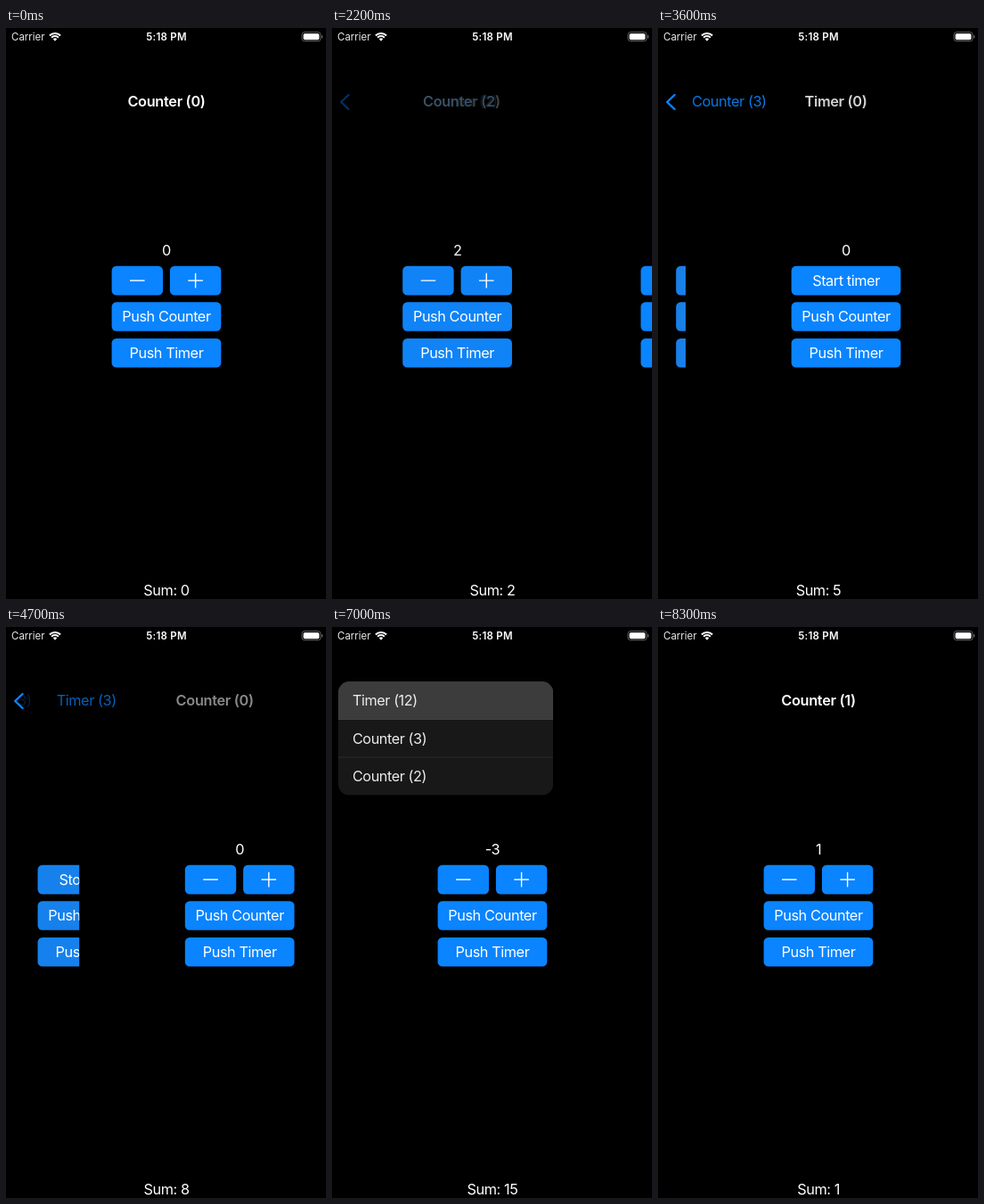
Animation, 359 px wide and 640 px high, one loop 8400 ms. Source, as an HTML page with a canvas:

```html
<!DOCTYPE html>
<html lang="en">
<head>
<meta charset="utf-8">
<title>Counter</title>
<style>
  html, body { margin: 0; width: 100%; height: 100%; overflow: hidden; background: #000; }
  canvas { display: block; width: 359px; height: 640px; }
</style>
</head>
<body>
<canvas id="stage"></canvas>
<script>
const W = 359, H = 640, MID = 180, LOOP = 8400, STEP = 100;
const BLUE = '#0a84ff', PRESSED = '#409cff';
const canvas = document.getElementById('stage');
const ratio = window.devicePixelRatio || 1;
canvas.width = W * ratio;
canvas.height = H * ratio;
const ctx = canvas.getContext('2d');

// Button presses: start, end, page, button
const presses = [
  [1600, 1700, 0, 'plus'], [1800, 1900, 0, 'plus'], [2000, 2100, 0, 'counter'],
  [2700, 2800, 1, 'plus'], [2900, 3000, 1, 'plus'], [3100, 3200, 1, 'plus'],
  [3300, 3400, 1, 'timer'], [3700, 3750, 2, 'toggle'], [4400, 4500, 2, 'counter'],
  [5200, 5300, 3, 'minus'], [5500, 5600, 3, 'minus'], [5800, 5900, 3, 'minus'],
  [8000, 8100, 0, 'minus']
];
const pushes = [2130, 3377, 4546];
const POP = 7500, TIMER_START = 3750, TICK = 250;
const MENU_OPEN = 6600, MENU_CLOSE = 7250;

const clamp = v => Math.max(0, Math.min(1, v));

// Critically damped spring, from 1 down to 0
function spring(ms) {
  const k = 18.26 * Math.max(0, ms) / 1000;
  return (1 + k) * Math.exp(-k);
}

function count(page, t) {
  if (page === 2) return Math.max(0, Math.floor((Math.min(t, POP) - TIMER_START) / TICK));
  let n = 0;
  for (const [, end, p, name] of presses) {
    if (p === page && t >= end) n += name === 'plus' ? 1 : name === 'minus' ? -1 : 0;
  }
  return n;
}

const title = (page, t) => `${page === 2 ? 'Timer' : 'Counter'} (${count(page, t)})`;

function isPressed(page, name, t) {
  return presses.some(([a, b, p, n]) => p === page && n === name && t >= a && t < b);
}

function font(size, weight, spacing) {
  ctx.font = `${weight} ${size}px Inter, Roboto, sans-serif`;
  ctx.letterSpacing = spacing + 'px';
}

function text(str, x, y, { align = 'left', size = 16.3, weight = 400, gap = -0.43, color = '#fff', alpha = 1 } = {}) {
  if (alpha <= 0) return;
  ctx.save();
  font(size, weight, gap);
  ctx.textAlign = align;
  ctx.fillStyle = color;
  ctx.globalAlpha *= alpha;
  ctx.fillText(str, x, y);
  ctx.restore();
}

function box(x, y, w, h, r, color) {
  ctx.fillStyle = color;
  ctx.beginPath();
  ctx.roundRect(x, y, w, h, r);
  ctx.fill();
}

function stroke(points, color, width) {
  ctx.strokeStyle = color;
  ctx.lineWidth = width;
  ctx.beginPath();
  points.forEach(([x, y]) => ctx.lineTo(x, y));
  ctx.stroke();
}

function statusBar() {
  text('Carrier', 6, 14, { size: 11.5, gap: 0, color: '#e8e8e8' });
  text('5:18 PM', MID, 14, { size: 11.5, weight: 600, gap: 0.25, align: 'center' });
  ctx.save();
  ctx.strokeStyle = ctx.fillStyle = '#fff';
  ctx.lineWidth = 2;
  const a = -Math.PI * 0.75, b = -Math.PI * 0.25;
  for (const r of [8.6, 5.5]) {
    ctx.beginPath();
    ctx.arc(55, 14.6, r, a, b);
    ctx.stroke();
  }
  ctx.beginPath();
  ctx.moveTo(55, 14.8);
  ctx.arc(55, 14.6, 3.2, a, b);
  ctx.fill();
  ctx.strokeStyle = '#606060';
  ctx.lineWidth = 1;
  ctx.beginPath();
  ctx.roundRect(332, 4.7, 21, 10, 2.8);
  ctx.stroke();
  box(333.6, 6.2, 17.8, 7, 1.6, '#fff');
  box(354, 8, 1.3, 3.6, 0.7, '#606060');
  ctx.restore();
}

function button(page, name, x, y, w, label, t, dim) {
  const down = isPressed(page, name, t);
  const base = `rgb(${10 + 16 * dim}, ${132 - 4 * dim}, ${255 - 25 * dim})`;
  box(x, y, w, 32.6, 5.2, down ? PRESSED : base);
  const ink = down ? '#d9ebff' : '#fff', mx = x + w / 2, my = y + 16.3;
  if (label) {
    text(label, mx, my + 5.7, { align: 'center', color: ink });
  } else {
    stroke([[mx - 8.3, my], [mx + 8.3, my]], ink, 1.4);
    if (name === 'plus') stroke([[mx, my - 8.3], [mx, my + 8.3]], ink, 1.4);
  }
}

function drawPage(page, dx, t, dim = 0) {
  ctx.save();
  ctx.translate(dx, 0);
  ctx.globalAlpha = 1 - 0.1 * dim;
  text(String(count(page, t)), MID, 255, { align: 'center' });
  ctx.globalAlpha = 1;
  const x = 118.6, w = 122.7;
  if (page === 2) {
    button(page, 'toggle', x, 266.8, w, t < TIMER_START ? 'Start timer' : 'Stop timer', t, dim);
  } else {
    button(page, 'minus', x, 266.8, 57.4, '', t, dim);
    button(page, 'plus', 183.9, 266.8, 57.4, '', t, dim);
  }
  button(page, 'counter', x, 307.2, w, 'Push Counter', t, dim);
  button(page, 'timer', x, 348, w, 'Push Timer', t, dim);
  ctx.restore();
}

function chevron(alpha) {
  ctx.save();
  ctx.globalAlpha = alpha;
  ctx.lineCap = ctx.lineJoin = 'round';
  stroke([[18.6, 75], [10.2, 83], [18.6, 91]], BLUE, 2.4);
  ctx.restore();
}

function titleWidth(str) {
  font(16.3, 600, -0.3);
  return ctx.measureText(str).width;
}

function heading(str, x, alpha) {
  text(str, x, 88.4, { align: 'center', weight: 600, gap: -0.3, alpha });
}

function backLabel(str, x, alpha) {
  ctx.save();
  ctx.beginPath();
  ctx.rect(14, 60, W, 50);
  ctx.clip();
  text(str, x, 88.4, { color: BLUE, alpha });
  ctx.restore();
}

// p: share of the way the upper page still is off to the right
function navBar(under, over, p, t, held) {
  if (over === 0) {
    heading(title(0, t), MID, 1);
    return;
  }
  const from = title(under, t), to = title(over, t);
  const fw = titleWidth(from), tw = titleWidth(to);
  const shift = (MID - fw / 2 - 20) * p;
  const press = held ? 0.35 : 1;
  if (p > 0.001) {
    const old = over === 3 && t >= POP ? title(2, t) : under > 0 ? title(under - 1, t) : '';
    if (under > 0) backLabel(old, 28 - 0.3 * W * (1 - p), p);
    heading(from, 28 + fw / 2 + shift, clamp(2 * p - 1));
  }
  chevron((under > 0 ? 1 : 1 - p) * press);
  backLabel(from, 28 + shift, clamp(1 - 1.2 * p) * press);
  heading(to, MID + (MID + tw * 0.65) * p, clamp(1 - 2 * p));
}

function menu(t) {
  if (t < MENU_OPEN || t >= MENU_CLOSE + 250) return;
  const closing = t >= MENU_CLOSE;
  const p = closing ? 1 - spring(t - MENU_CLOSE) : spring(t - MENU_OPEN);
  const x = 7, y = 61, w = 242, h = 128, row = h / 3;
  const hot = t < 7000 || closing ? -1 : t < 7100 ? 0 : t < 7200 ? 1 : 2;
  ctx.save();
  ctx.translate(x, y);
  ctx.scale(1 - 0.6 * p, 1 - 0.6 * p);
  ctx.globalAlpha = clamp(1 - p * 1.1);
  ctx.beginPath();
  ctx.roundRect(0, 0, w, h, 12.5);
  ctx.clip();
  ctx.fillStyle = '#191919';
  ctx.fillRect(0, 0, w, h);
  ['Timer (12)', 'Counter (3)', 'Counter (2)'].forEach((label, i) => {
    if (i === hot) {
      ctx.fillStyle = '#3d3d3d';
      ctx.fillRect(0, i * row, w, row);
    }
    if (i) {
      ctx.fillStyle = i === hot + 1 ? '#4a4a4a' : '#303030';
      ctx.fillRect(0, i * row - 0.4, w, 0.8);
    }
    text(label, 16, i * row + 27.4, { color: '#ececec' });
  });
  ctx.restore();
}

function scene(t) {
  ctx.setTransform(ratio, 0, 0, ratio, 0, 0);
  ctx.fillStyle = '#000';
  ctx.fillRect(0, 0, W, H);

  let over = pushes.filter(s => t >= s).length;
  let under = Math.max(0, over - 1);
  let p = over ? spring(t - pushes[over - 1]) : 0;
  if (t >= POP) {
    under = 0;
    p = 1 - spring(t - POP);
    if (p > 0.996) over = 0;
  }
  const edge = over ? p * W : 0;

  if (edge > 0.3) {
    ctx.save();
    ctx.beginPath();
    ctx.rect(0, 0, edge, H);
    ctx.clip();
    drawPage(under, -0.3 * W * (1 - p), t, 1 - p);
    ctx.restore();
  }
  drawPage(over, edge, t);
  navBar(under, over, p, t, t >= 6200 && t < MENU_CLOSE);
  menu(t);

  const live = t >= POP ? 0 : pushes.filter(s => t >= s).length;
  let sum = 0;
  for (let i = 0; i <= live; i++) sum += count(i, t);
  text('Sum: ' + sum, MID, 636, { align: 'center' });
  statusBar();
}

function tick() {
  const t = performance.now() % LOOP;
  scene(Math.floor(t / STEP) * STEP);
  requestAnimationFrame(tick);
}
tick();
</script>
</body>
</html>
```
